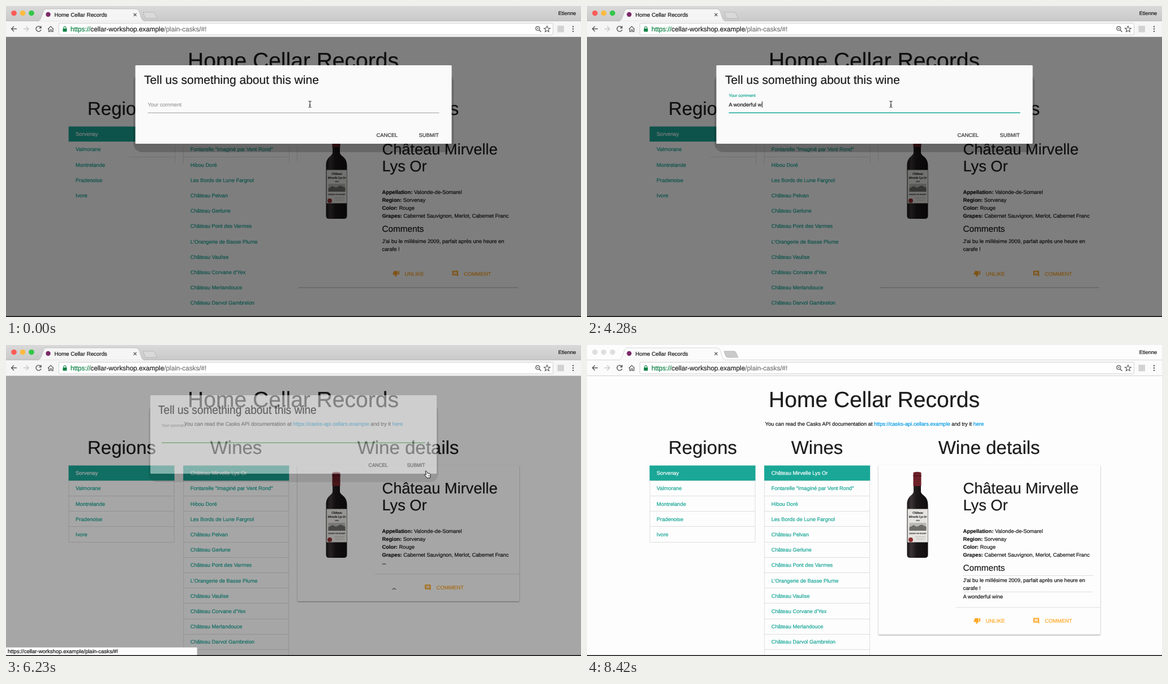
Animation, 1016 px wide and 551 px high, one loop 8.52 s. Source, as an HTML page:

```html
<!DOCTYPE html>
<html lang="en">
<head>
<meta charset="utf-8">
<title>Home Cellar Records</title>
<style>
html, body { margin: 0; width: 100%; height: 100%; overflow: hidden; background: #fdfdfd; }
svg { display: block; width: 1016px; height: 551px; font-family: "Liberation Sans", Arial, sans-serif; }
text { white-space: pre; stroke-width: .22px; text-rendering: geometricPrecision; }
.card { fill: #fdfdfd; filter: drop-shadow(0 1px 1.2px rgba(0, 0, 0, .4)); }
</style>
</head>
<body>
<svg id="stage" viewBox="0 0 1016 551"></svg>
<script>
const LOOP = 8520;
const BODY = 9.32;
const INK = '#1c1c1c', TEAL = '#1aa797', ORANGE = '#ffa726', RULE = '#dedede';
const stage = document.getElementById('stage');
const measure = document.createElement('canvas').getContext('2d');
measure.font = `${BODY}px "Liberation Sans", Arial, sans-serif`;

const regions = ['Sorvenay', 'Valmorane', 'Montrelande', 'Pradenoise', 'Ivore'];
const wines = [
  'Château Mirvelle Lys Or', 'Fontarelle "Imaginé par Vent Rond"', 'Hibou Doré',
  'Les Bords de Lune Fargnol', 'Château Pelvan', 'Château Gerlune',
  'Château Pont des Varmes', "L'Orangerie de Basse Plume", 'Château Vaulise',
  "Château Corvane d'Yex", 'Château Merlandouce', 'Château Darvol Gambrelon'
];
const address = ['https://', 'cellar-workshop.example', '/plain-casks/#!'];

// Each entry: start time, field content, caret visible
const typing = [
  [0, '', 0], [390, '', 1], [680, '', 0], [830, 'A', 1], [1130, 'A ', 1], [1280, 'A c', 1],
  [1730, 'A ', 1], [1880, 'A w', 1], [2030, 'A wo', 1], [2180, 'A won', 1], [2330, 'A wonde', 1],
  [2630, 'A wonder', 1], [2780, 'A wonderf', 1], [2930, 'A wonderfu', 1], [3230, 'A wonderful', 1],
  [3680, 'A wonderful', 0], [3980, 'A wonderful ', 1], [4280, 'A wonderful w', 1],
  [4430, 'A wonderful wi', 1], [4580, 'A wonderful win', 1], [4730, 'A wonderful wine', 1],
  [5340, 'A wonderful wine', 0], [6050, '', 0]
];

// Pointer path: time, x, y
const pointerPath = [
  [0, 537, 174], [4730, 537, 174], [5200, 745, 229], [6620, 745, 229],
  [7440, 850, 461], [8030, 1008, 565]
];

const paint = colour => `fill="${colour}" stroke="${colour}"`;
const text = (x, y, size, content, colour = INK, extra = '') =>
  `<text x="${x}" y="${y}" font-size="${size}" ${paint(colour)} ${extra}>${content}</text>`;
const centred = (x, y, size, content, colour) => text(x, y, size, content, colour, 'text-anchor="middle"');
const span = (content, colour) => `<tspan ${paint(colour)}>${content}</tspan>`;
const rect = (x, y, w, h, fill, extra = '') =>
  `<rect x="${x}" y="${y}" width="${w}" height="${h}" fill="${fill}" ${extra}/>`;
const line = (d, stroke, width = 1) => `<path d="${d}" fill="none" stroke="${stroke}" stroke-width="${width}"/>`;
const shape = (d, fill, extra = '') => `<path d="${d}" fill="${fill}" ${extra}/>`;
const dot = (x, y, r, fill, extra = '') => `<circle cx="${x}" cy="${y}" r="${r}" fill="${fill}" ${extra}/>`;
const group = (content, attributes) => `<g ${attributes}>${content}</g>`;

function browser(active) {
  const bar = active ? '#f5f5f5' : '#fbfbfb';
  const lights = active ? ['#fc5b57', '#fdbb3f', '#33c748'] : ['#dedede', '#dedede', '#dedede'];
  const grey = '#555';
  return rect(0, 0, 1016, 27, active ? 'url(#titlebar)' : '#fdfdfd')
    + lights.map((c, i) => dot(14 + 15.5 * i, 12.7, 4.8, c)).join('')
    + rect(0, 26, 1016, 29, bar)
    + line('M0 26.5H1016', active ? '#b9b9b9' : '#d6d6d6')
    + line('M0 54.5H1016', '#d2d2d2')
    + shape('M56 27C61 26 62 21 65 12Q67 5 71 5H230Q234 5 236 11C239 21 240 26 245 27Z', bar,
        `stroke="${active ? '#b4b4b4' : '#cfcfcf'}" stroke-width=".8"`)
    + rect(57, 26.6, 187, 2, bar)
    + shape('M242 11H260Q262 11 263 13L267 22H249Q246 22 245 19Z', active ? '#d9d9d9' : '#cacaca',
        'stroke="#b0b0b0" stroke-width=".8"')
    + dot(74.5, 15, 4.2, '#7b2a68')
    + text(85.5, 18.6, 9.75, 'Home Cellar Records')
    + line('M225.5 13l5 5m0-5l-5 5', grey, 1.1)
    + centred(991.5, 16.4, 9.3, 'Etienne')
    + line('M19 40.5H9.5m4.5-4.5l-4.5 4.5 4.5 4.5', grey, 1.4)
    + line('M31 40.5H40m-4.5-4.5l4.5 4.5-4.5 4.5', '#c8c8c8', 1.4)
    + line('M61.5 38A4.6 4.6 0 1 0 62 42M62 35.5V39H58.5', grey, 1.4)
    + line('M74 41L79 36 84 41M75.5 40.5V45.5H78V42H80.5V45.5H83V40', grey, 1.2)
    + rect(93.5, 30.5, 873, 20.5, '#fff', 'rx="2" stroke="#cfcfcf"')
    + rect(100.5, 40, 7, 5.5, '#0b8043', 'rx=".6"')
    + line('M102 40V38.5a2 2 0 0 1 4 0V40', '#0b8043', 1.2)
    + text(114, 44.7, 11.75, address[0] + span(address[1], '#222') + span(address[2], '#777'), '#0b8043')
    + dot(939.5, 39.8, 3.5, 'none', `stroke="${grey}" stroke-width="1.2"`)
    + line('M942 42.5l3.5 3.5M938 39.8h3', grey, 1.3)
    + line('M956 35.5l1.5 3.6 3.9.3-3 2.5 1 3.8-3.4-2.1-3.4 2.1 1-3.8-3-2.5 3.9-.3z', grey, 1.1)
    + rect(974.5, 35, 11.5, 11.5, '#d2d2d2')
    + [36.5, 40.7, 44.9].map(y => dot(1002, y, 1.2, grey)).join('');
}

function list(items, x, bottom, ruled) {
  const pitch = 27.2, top = 213.5, width = 187;
  const rules = items.map((_, i) => `M${x} ${Math.round(top + pitch * (i + 1)) - .5}h${width}`).join('');
  return (ruled ? line(`M${x + .5} ${top}V${bottom}M${x + width - .5} ${top}V${bottom}${rules}`, RULE) : '')
    + rect(x, top, width, 26.7, TEAL)
    + items.map((name, i) => text(x + 12.5, 230.2 + pitch * i, BODY, name, i ? TEAL : '#fff')).join('');
}

function bottle() {
  return shape('M577 226H590V259C590 267 602.5 266 602.5 283V372Q602.5 377 597 377H571Q565.5 377 565.5 372V283C565.5 266 577 267 577 259Z', 'url(#glass)')
    + shape('M576.5 226Q583.5 223.5 590.5 226V250H576.5Z', '#6c2028')
    + rect(576, 231, 15, 1.3, '#4b1319')
    + rect(566.5, 290.5, 35.5, 59, '#e4e3df')
    + group(centred(584.5, 299, 5.5, 'Château') + centred(584.5, 306, 5, 'Mirvelle Lys Or'),
        'font-family="Liberation Serif, serif" font-style="italic"')
    + centred(584.5, 312, 3, '2009', '#555')
    + rect(569.5, 315, 30, 14, '#b9b9b5')
    + shape('M569.5 329V323L577 319 583 322 591 318 599.5 322V329Z', '#6c6d69')
    + centred(584.5, 335, 3.2, 'GRAND VIN ROUGE', '#444')
    + line('M580 340h18m-16 4h14', '#aaa', .8)
    + dot(572, 345, 4, '#8d3033');
}

const icons = {
  unlike: 'M15 3H6c-.8 0-1.5.5-1.8 1.2l-3 7.1c-.1.2-.2.5-.2.7v2c0 1.1.9 2 2 2h6.3l-1 4.6v.3c0 .4.2.8.5 1.1L9.8 23l6.6-6.6c.4-.4.6-.9.6-1.4V5c0-1.1-.9-2-2-2zm4 0v12h4V3h-4z',
  comment: 'M22 4c0-1.1-.9-2-2-2H4c-1.1 0-2 .9-2 2v12c0 1.1.9 2 2 2h14l4 4V4zm-4 10H6v-2h12v2zm0-3H6V9h12v2zm0-3H6V6h12v2z'
};
const action = (x, y, icon, label) =>
  shape(icons[icon], ORANGE, `transform="translate(${x - .5} ${y - 6}) scale(.52)"`)
  + text(x + 21, y + 3.5, BODY, label, ORANGE);
const loader = (x, y) => dot(x - 2.5, y + .5, .8, INK) + dot(x, y - .5, .9, INK) + dot(x + 2.5, y + .5, .8, INK);

function details(state) {
  const bottom = { before: 498.5, loading: 454, after: 513 }[state];
  const divider = bottom - 48, actions = bottom - 24.5;
  const facts = [['Appellation', 'Valonde-de-Somarel'], ['Region', 'Sorvenay'], ['Color', 'Rouge'],
    ['Grapes', 'Cabernet Sauvignon, Merlot, Cabernet Franc']];
  let out = state === 'before' ? '' : `<rect class="card" x="515" y="213" width="392" height="${bottom - 213}" rx="1.5"/>`
    + line(`M652 ${divider}H907`, RULE);
  out += bottle() + text(664.5, 263, 27.2, 'Château Mirvelle') + text(664.5, 292.5, 27.2, 'Lys Or')
    + facts.map(([key, value], i) => text(664.5, 332.8 + 14 * i, BODY, `<tspan font-weight="bold">${key}:</tspan> ${value}`)).join('');
  if (state === 'loading')
    return out + loader(668, 388) + loader(686, 432) + action(739.5, actions, 'comment', 'COMMENT');
  out += text(664.5, 399.5, 15.3, 'Comments')
    + text(664.5, 419.5, BODY, "J'ai bu le millésime 2009, parfait après une heure en")
    + text(664.5, 433.5, BODY, 'carafe !');
  if (state === 'after')
    out += line('M664 408.5H894M664 437.5H894', RULE) + text(664.5, 448.5, BODY, 'A wonderful wine');
  return out + action(683.5, actions, 'unlike', 'UNLIKE') + action(788, actions, 'comment', 'COMMENT');
}

function page(state) {
  const ruled = state !== 'before';
  const link = content => span(content, '#039be5');
  return rect(0, 55, 1016, 496, '#fdfdfd')
    + centred(507.5, 110, 39, 'Home Cellar Records')
    + centred(508, 143, BODY, `You can read the Casks API documentation at ${link('https://casks-api.cellars.example')} and try it ${link('here')}`)
    + centred(204.5, 192.8, 33, 'Regions') + centred(406.5, 192.8, 33, 'Wines') + centred(710.5, 192.8, 33, 'Wine details')
    + list(regions, 110.6, 349, ruled) + list(wines, 313.2, 549, ruled) + details(state);
}

function modal(t) {
  const [, value, caret] = typing.findLast(step => t >= step[0]);
  const lift = t < 150 ? 0 : t < 390 ? .5 : 1;
  const accent = t < 150 ? '#9e9e9e' : t < 5870 ? TEAL : '#4caf50';
  const labelColour = t < 150 || t >= 5870 ? '#9e9e9e' : TEAL;
  const caretX = 250.5 + measure.measureText(value).width;
  const ripple = t < 5690 ? 0 : t < 5870 ? 16 : t < 6050 ? 32 : 60;
  const closing = t >= 6230;
  const content = rect(225, 119, 566, 140, '#000', 'rx="16" opacity=".18"')
    + rect(228.5, 105, 559, 139, '#fafafa', 'rx="1.5"')
    + text(244, 138.3, 21.05, 'Tell us something about this wine')
    + text(250.5, 178 - 17.5 * lift, BODY - 1.95 * lift, 'Your comment', labelColour)
    + text(250.5, 178, BODY, value)
    + (caret ? rect(caretX, 169, .9, 11, '#111') : '')
    + line('M250.5 189.3H765.5', accent, t < 150 ? 1 : 1.6)
    + (ripple && !closing ? dot(745, 229, ripple, '#4caf50', 'opacity=".42" clip-path="url(#submit)"') : '')
    + text(654.5, 232.3, BODY, 'CANCEL', '#343434') + text(729.5, 232.3, BODY, 'SUBMIT', '#343434');
  return group(content, closing ? 'opacity=".48" transform="translate(48.26 -16) scale(.905 1)"' : '');
}

function pointer(t) {
  if (t >= 8030) return '';
  // The pointer advances in short holds, like a low-rate screen capture
  const start = t < 6620 ? 4730 : 6620;
  const now = Math.max(0, start + Math.floor((t - start) / 157) * 157);
  const i = Math.max(1, pointerPath.findIndex(p => now < p[0]));
  const [t0, x0, y0] = pointerPath[i - 1], [t1, x1, y1] = pointerPath[i];
  const k = (now - t0) / (t1 - t0);
  const at = `transform="translate(${x0 + (x1 - x0) * k} ${y0 + (y1 - y0) * k})"`;
  const outline = 'stroke-linejoin="round" stroke-width="1" stroke=';
  if (now <= 4730)
    return group(line('M-2.5-5.5Q0-5.5 0-4 0-5.5 2.5-5.5M0-4V4M-2.5 5.5Q0 5.5 0 4 0 5.5 2.5 5.5M-1.3 1.5H1.3', '#111'), at);
  if (t >= 5200 && t < 6620)
    return group(shape('M-4-5.5Q-2.5-6.5-1.7-5L-.5-2 3-1.5Q5-1 5 1L4.3 6.5H-.8L-5 1.5Q-5.5-.2-3.5.2L-2.5 1Z', '#fff', `${outline}"#111"`)
      + line('M.8 1V4M2.7 1V4', '#333', .7), at);
  return group(shape('M-4-6V5.5L-1.5 3.2.3 7.2 2.3 6.3.5 2.5H4Z', '#111', `${outline}"#fff"`), at);
}

function scene(t) {
  const state = t < 6230 ? 'before' : t < 6410 ? 'loading' : 'after';
  const shade = { before: .5, loading: .345, after: 0 }[state];
  let out = `<defs>
    <linearGradient id="titlebar" x2="0" y2="1"><stop stop-color="#d9d9d9"/><stop offset="1" stop-color="#c9c9c9"/></linearGradient>
    <linearGradient id="glass"><stop stop-color="#181416"/><stop offset=".2" stop-color="#3b3436"/><stop offset=".45" stop-color="#1c1719"/><stop offset="1" stop-color="#100d0e"/></linearGradient>
    <clipPath id="submit"><rect x="711" y="218.5" width="73" height="22" rx="1"/></clipPath></defs>`;
  out += page(state);
  if (shade) out += rect(0, 55, 1016, 496, '#000', `opacity="${shade}"`);
  if (state === 'before')
    out += line('M218 267.5H298.5M298.5 247V280M313.5 247V280M313 267.5H500.5M500.5 247V280M514.5 247V275', '#707070')
      + line('M517 499H905', '#666', 1.3);
  if (state !== 'after') out += modal(t);
  out += browser(t < 8420);
  if (t >= 5340 && t < 6777)
    out += rect(-1, 535.5, 339, 15, '#fcfcfc', 'rx="1.5" stroke="#b5b5b5"') + text(3, 546, 9.55, address.join(''));
  return out + rect(0, 549.5, 1016, 1.5, '#0b0808') + pointer(t);
}

let shown = '';
function draw() {
  const next = scene(performance.now() % LOOP);
  if (next !== shown) stage.innerHTML = shown = next;
  requestAnimationFrame(draw);
}
draw();
</script>
</body>
</html>
```
